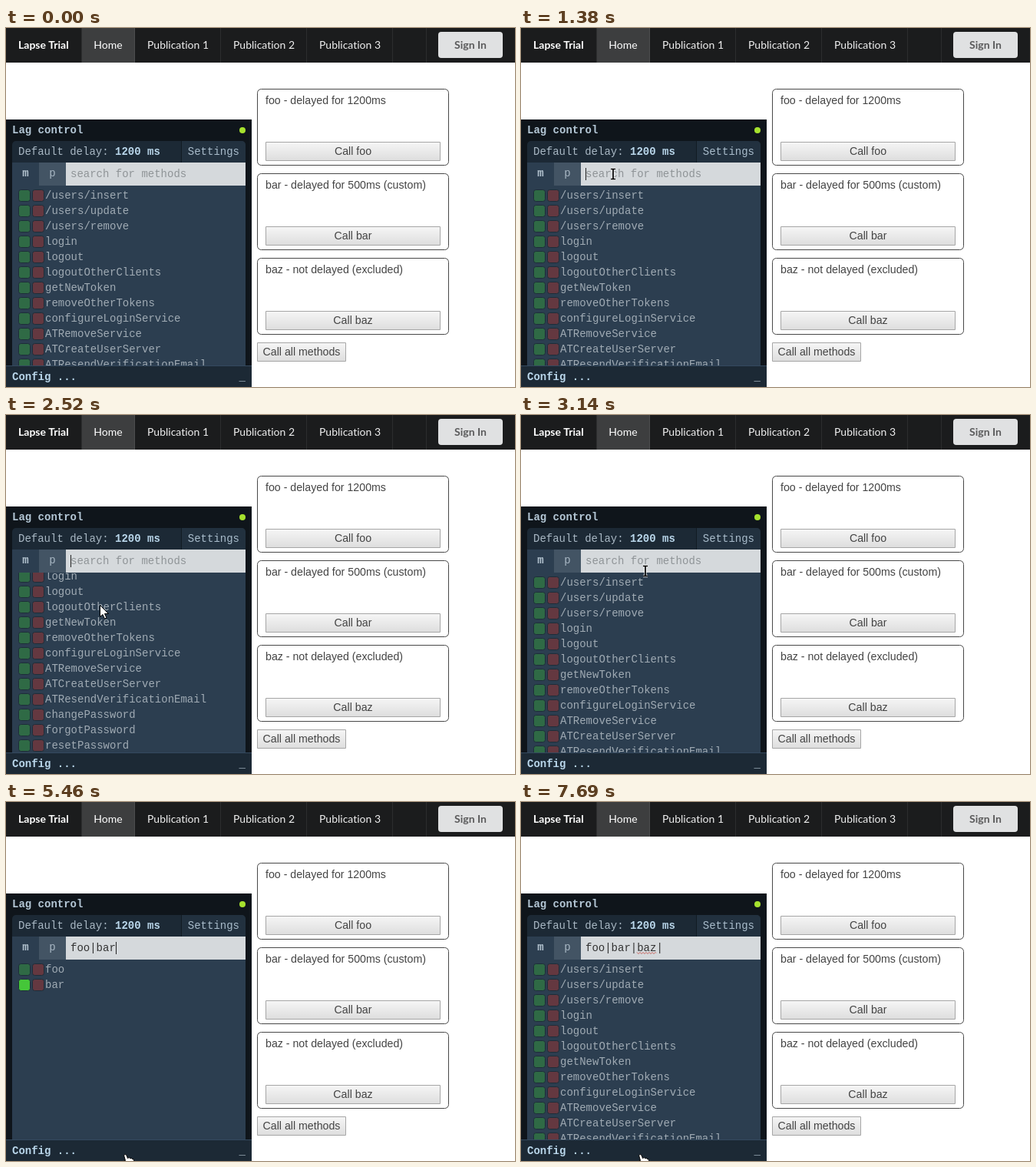
Animation, 663 px wide and 467 px high, one loop 8000 ms. Source, as an HTML page with a canvas:

```html
<!DOCTYPE html>
<html lang="en">
<head>
<meta charset="utf-8">
<title>Lag control</title>
<style>
html, body { margin: 0; width: 100%; height: 100%; overflow: hidden; background: #fff; }
canvas { display: block; }
</style>
</head>
<body>
<canvas id="stage" width="663" height="467"></canvas>
<script>
const c = document.getElementById('stage').getContext('2d');
const LOOP = 8000;
const LATO = '14px Lato, sans-serif';
const SANS = '14.2px "Liberation Sans", Arial, sans-serif';
const MONO = '14px "Liberation Mono", monospace';
const BOLD = 'bold ' + MONO;
const CHAR = 8.4;

const METHODS = [
  '/users/insert', '/users/update', '/users/remove', 'login', 'logout',
  'logoutOtherClients', 'getNewToken', 'removeOtherTokens',
  'configureLoginService', 'ATRemoveService', 'ATCreateUserServer',
  'ATResendVerificationEmail', 'changePassword', 'forgotPassword',
  'resetPassword', 'verifyEmail', 'createUser', 'foo', 'bar', 'baz'
];

const CLICK = 1380;
const BLINK = 530;

// bursts of typing: first key, time between keys, keys
const BURSTS = [
  { at: 4160, gap: 105, keys: 'foo' },
  { at: 5030, gap: 143, keys: '|bar' },
  { at: 5940, gap: 190, keys: '|ba' },
  { at: 6660, gap: 460, keys: 'z|' }
];

const ENTER = { t: 370, x: 83, y: 414 };
const MOVES = [
  { from: 370, to: 1170, x: 117, y: 205 },
  { from: 1170, to: 1330, x: 120, y: 190 },
  { from: 1510, to: 1710, x: 122, y: 247 },
  { from: 2820, to: 3140, x: 162, y: 203, dip: 24 },
  { from: 3460, to: 3620, x: 155, y: 459 }
];

// progress from 0 to 1, advancing once per step
function ramp(t, from, to, step = 40) {
  const s = Math.floor((t - from) / step + 1e-6) * step;
  return Math.min(1, Math.max(0, s / (to - from)));
}

const easeOut = (p, power) => 1 - (1 - p) ** power;

function pointerAt(t) {
  let { x, y } = ENTER;
  for (const m of MOVES) {
    const p = ramp(t, m.from, m.to), e = easeOut(p, 2);
    x += (m.x - x) * e;
    y += (m.y - y) * e + (m.dip || 0) * Math.sin(Math.PI * p);
  }
  return [Math.round(x), Math.round(y)];
}

function scrollAt(t) {
  const down = easeOut(ramp(t, 1880, 2220, 68), 3);
  return Math.round(170 * (down - ramp(t, 2400, 2600)));
}

function typing(t) {
  let query = '', last = CLICK;
  for (const { at, gap, keys } of BURSTS) {
    [...keys].forEach((key, i) => {
      if (t < at + gap * i) return;
      query += key;
      last = at + gap * i;
    });
  }
  const caret = t >= last && (t - last) % (2 * BLINK) < BLINK;
  return { query, caret };
}

function rect(x, y, w, h, fill) {
  c.fillStyle = fill;
  c.fillRect(x, y, w, h);
}

function round(x, y, w, h, r, fill, stroke) {
  c.beginPath();
  c.roundRect(x, y, w, h, r);
  c.fillStyle = fill;
  c.fill();
  if (stroke) line(stroke, 1);
}

function line(color, width) {
  c.strokeStyle = color;
  c.lineWidth = width;
  c.stroke();
}

function text(str, x, y, font, fill, align = 'left') {
  c.font = font;
  c.textRendering = 'optimizeSpeed'; // no ligatures or kerning
  c.fillStyle = fill;
  c.textAlign = align;
  c.fillText(str, x, y);
}

function drawNav() {
  rect(0, 0, 663, 45, '#1b1c1d');
  rect(99, 0, 69, 45, '#3d3e3f');
  for (const x of [98, 167, 279, 391, 503, 547]) rect(x, 0, 1, 45, 'rgba(255,255,255,.08)');
  text('Lapse Trial', 16, 27, 'bold ' + LATO, '#fff');
  text('Home', 133, 27, LATO, '#fff', 'center');
  for (let i = 1; i < 4; i++) {
    text('Publication ' + i, 112 * i + 112, 27, LATO, '#f0f0f0', 'center');
  }
  round(563, 5, 84, 34, 4, '#e0e1e2');
  text('Sign In', 605, 27, 'bold ' + LATO, '#5a5a5b', 'center');
}

function button(label, x, y, w) {
  const g = c.createLinearGradient(0, y, 0, y + 25);
  g.addColorStop(0, '#f6f6f6');
  g.addColorStop(1, '#dddddd');
  round(x + .5, y + .5, w - 1, 24, 0, g, '#a6a6a6');
  text(label, x + w / 2, y + 17, SANS, '#444', 'center');
}

function drawCards() {
  const notes = {
    foo: 'delayed for 1200ms',
    bar: 'delayed for 500ms (custom)',
    baz: 'not delayed (excluded)'
  };
  Object.keys(notes).forEach((name, i) => {
    const y = 79 + 110 * i;
    round(327.5, y + .5, 249, 99, 5, '#fff', '#484848');
    text(name + ' - ' + notes[name], 338, y + 20, SANS, '#444');
    button('Call ' + name, 338, y + 69, 228);
  });
  button('Call all methods', 327, 409, 116);
}

function drawList(query, scroll) {
  const match = new RegExp(query);
  c.save();
  c.beginPath();
  c.rect(8, 205, 304, 234);
  c.clip();
  METHODS.filter(m => match.test(m)).forEach((name, i) => {
    const y = 207 + 20 * i - scroll;
    round(16.5, y + 3.5, 15, 15, 3, name === 'bar' ? '#45c639' : '#2f6a45', '#1d2d39');
    round(34.5, y + 3.5, 15, 15, 3, name === 'baz' ? '#913018' : '#643840', '#1d2d39');
    text(name, 51, y + 15, MONO, '#a0abb4');
  });
  c.restore();
}

function drawSearch(query, caret) {
  rect(78, 175, 234, 30, '#d5d9dc');
  if (query) text(query, 84, 194, MONO, '#333');
  else text('search for methods', 84, 194, MONO, '#8f9497');
  if (query.endsWith('baz|')) {
    c.beginPath();
    for (let x = 151; x <= 176; x++) c.lineTo(x, 196.5 + Math.sin(x * Math.PI / 2));
    line('#c8564c', 1);
  }
  if (caret) rect(Math.round(84 + CHAR * query.length), 182, 1, 16, '#222');
}

function drawPanel(t) {
  const { query, caret } = typing(t);
  rect(0, 119, 320, 348, '#0f151b');
  text('Lag control', 8, 137, BOLD, '#b4c7d6');
  c.beginPath();
  c.arc(308, 133, 4, 0, Math.PI * 2);
  c.fillStyle = '#a6e22e';
  c.fill();

  round(8, 147, 304, 28, [5, 5, 0, 0], '#1c2935');
  round(229, 147, 83, 28, [0, 5, 0, 0], '#22313f');
  rect(228, 147, 1, 28, '#121b23');
  text('Default delay:', 16, 165, MONO, '#a9b8c4');
  text('1200 ms', 142, 165, BOLD, '#b9d6ea');
  text('Settings', 236.8, 165, MONO, '#a9bccb');

  rect(8, 175, 304, 264, '#2c3e50');
  rect(43, 175, 35, 30, '#435464');
  text('m', 25.5, 193, BOLD, '#b4c4d0', 'center');
  text('p', 60.5, 193, MONO, '#a9b8c4', 'center');
  drawSearch(query, caret);
  drawList(query, scrollAt(t));

  rect(0, 439, 320, 28, '#1c2935');
  rect(0, 439, 320, 1, '#34495e');
  text('Config ...', 8, 458, BOLD, '#b9d6ea');
  text('_', 303.6, 458, MONO, '#a9b8c4');
}

function drawBeam(x, y) {
  c.beginPath();
  for (const end of [y - 6.5, y + 6.5]) {
    c.moveTo(x - 3, end);
    c.lineTo(x + 3, end);
  }
  c.moveTo(x, y - 6.5);
  c.lineTo(x, y + 6.5);
  line('rgba(255,255,255,.7)', 3.5);
  line('#000', 1.7);
}

const ARROW = new Path2D('M0 0V15L3.5 12L6 17.5L8.5 16.5L6 11H11Z');
const HAND = new Path2D('M-2 0Q0-2 1.5 0L3 4Q5 2 6 4Q8 3 9 5Q11 4 11 7V14H2L-3 8Q-3 6 0 7Z');

function drawPointer(t) {
  if (t < ENTER.t) return;
  const [x, y] = pointerAt(t);
  if (y <= 205) return drawBeam(x, y);
  const shape = y >= 439 ? HAND : ARROW;
  c.save();
  c.translate(x + .5, y + .5);
  c.lineJoin = 'round';
  c.lineWidth = 1;
  c.strokeStyle = '#000';
  c.fillStyle = '#fff';
  c.fill(shape);
  c.stroke(shape);
  c.restore();
}

function draw(t) {
  rect(0, 0, 663, 467, '#fff');
  drawNav();
  drawCards();
  drawPanel(t);
  drawPointer(t);
}

const start = performance.now();
function tick() {
  draw((performance.now() - start) % LOOP);
  requestAnimationFrame(tick);
}
tick();
</script>
</body>
</html>
```
